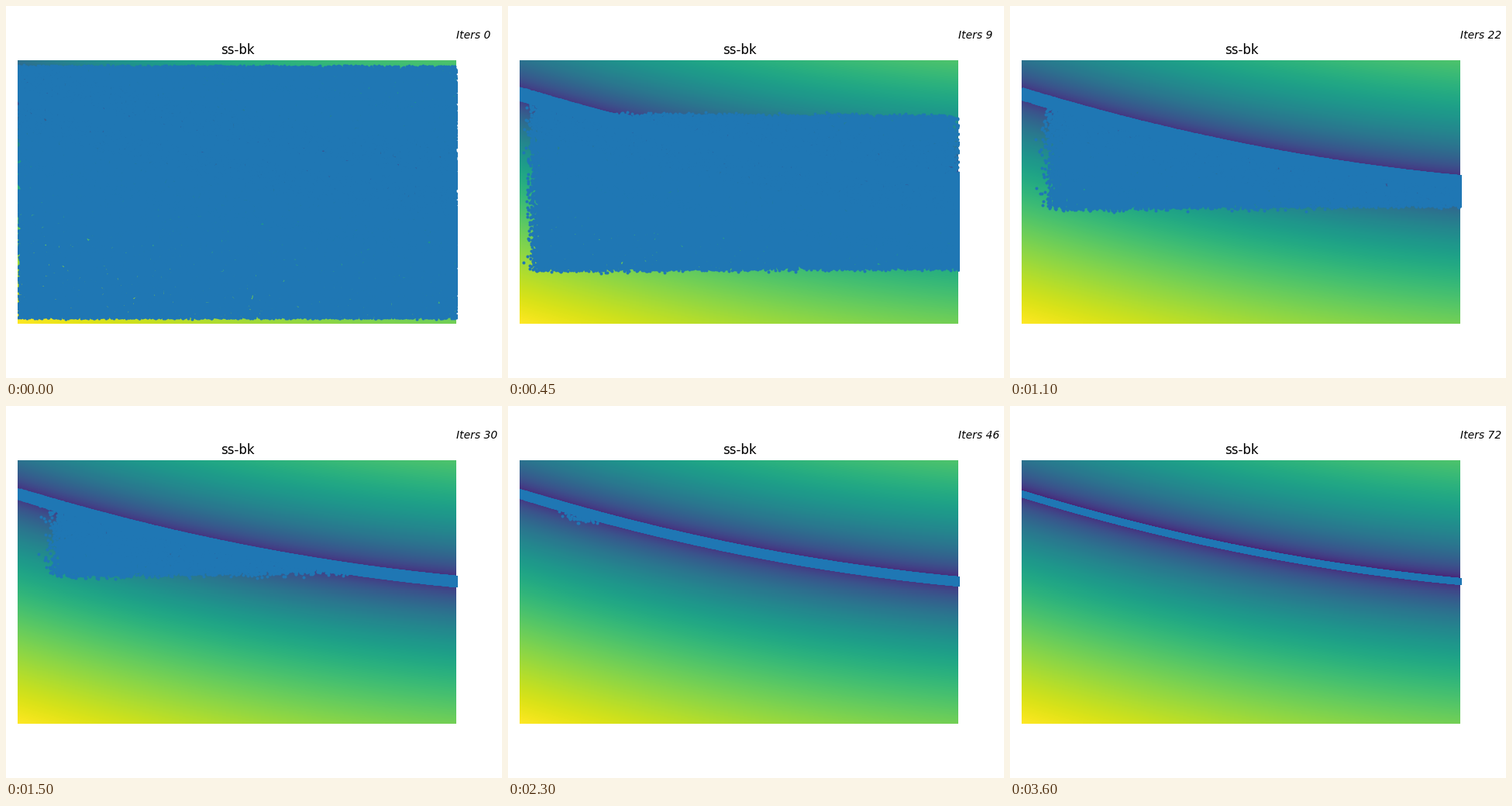
These frames come from a looping animation (640 px wide and 480 px high, 3650 ms). A matplotlib script:

```python
import numpy as np
import matplotlib.pyplot as plt
from matplotlib.animation import FuncAnimation

W, H, DPI = 640, 480, 100
LEFT, RIGHT, TOP, BOTTOM = 15, 581, 70, 410
FRAMES, INTERVAL = 73, 50
POINTS = 100_000
STEP, NOISE, DECAY = 7.8, 0.3, 100
SPAN = RIGHT - LEFT


def valley(x):
    t = (x - LEFT) / SPAN
    return 113 + 173 * t - 60 * t**2


def slope(x):
    t = (x - LEFT) / SPAN
    return (173 - 120 * t) / SPAN


def descend():
    """Noisy unit-gradient descent to the valley with a linearly decaying step."""
    rng = np.random.default_rng(7)
    x = rng.uniform(LEFT, RIGHT, POINTS)
    y = rng.uniform(TOP, BOTTOM, POINTS)
    path = np.empty((FRAMES, 2, POINTS), dtype=np.float32)
    for k in range(FRAMES):
        side = np.sign(y - valley(x))
        gx = side * slope(x) + rng.normal(0, NOISE, POINTS)
        move = STEP * (1 - k / DECAY) / np.hypot(gx, 1)
        x = np.clip(x + move * gx, LEFT, RIGHT)
        y = np.clip(y - move * side, TOP, BOTTOM)
        path[k] = x, y
    return path


path = descend()

fig = plt.figure(figsize=(W / DPI, H / DPI), dpi=DPI, facecolor="white")
ax = fig.add_axes([LEFT / W, 1 - BOTTOM / H, (SPAN + 1) / W, (BOTTOM - TOP) / H])
ax.axis("off")
ax.set_title("ss-bk", fontsize=12)

# The cost is the square root of the vertical distance to the valley.
gx, gy = np.meshgrid(np.arange(LEFT, RIGHT) + 0.5, np.arange(TOP, BOTTOM) + 0.5)
cost = np.sqrt(np.abs(gy - valley(gx)))
ax.imshow(cost, cmap="viridis", vmin=0, extent=(LEFT, RIGHT, BOTTOM, TOP),
          aspect="auto", interpolation="nearest")
ax.set_xlim(LEFT, RIGHT + 1)
ax.set_ylim(BOTTOM, TOP)

swarm, = ax.plot([], [], "o", color="#1f77b4", ms=2.88, mew=0)
label = fig.text(581 / W, 1 - 42.5 / H, "", fontsize=10, style="italic")


def update(n):
    swarm.set_data(path[n, 0], path[n, 1])
    label.set_text(f"Iters {n}")
    return swarm, label


anim = FuncAnimation(fig, update, frames=FRAMES, interval=INTERVAL,
                     repeat=True, repeat_delay=0)
plt.show()
```
